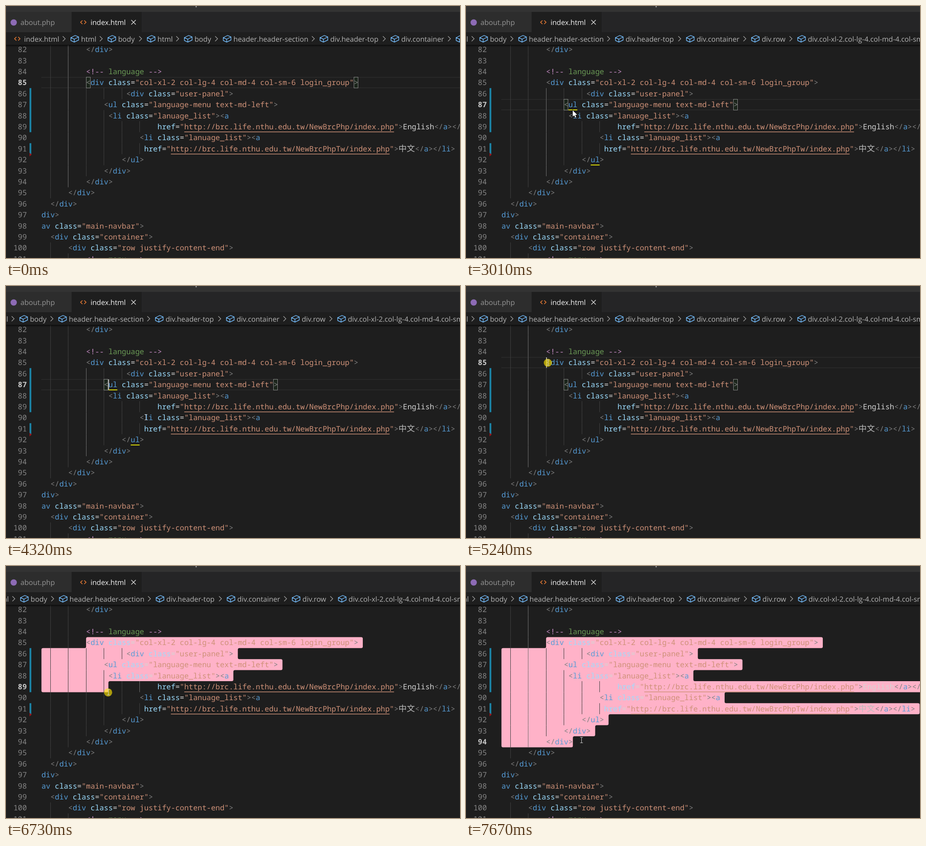
Animation of 1004 by 558 pixels, one loop 8000 ms. Source, as an HTML page with a canvas:

```html
<!DOCTYPE html>
<html lang="en">
<head>
<meta charset="utf-8">
<title>Code editor selection</title>
<style>
  html, body { margin: 0; width: 100%; height: 100%; overflow: hidden; background: #1e1e1e; }
  canvas { display: block; }
</style>
</head>
<body>
<canvas id="stage" width="1004" height="558"></canvas>
<script>
const W = 1004, H = 558, LOOP = 8000;
const ctx = document.getElementById('stage').getContext('2d');
const MONO = '"Noto Sans Mono", "DejaVu Sans Mono", monospace';
const CODE_FONT = `16.45px ${MONO}`;
const UI_FONT = '15.7px "Open Sans", "Noto Sans", sans-serif';
const CJK_FONT = '300 18px "Noto Sans CJK TC", "Noto Sans CJK SC", sans-serif';
const CHAR = 9.87, ROW = 24.4, FIRST = 82, WIDE = 1.85;
const BASELINE = 18, UNDERLINE = 23;
const COLOR = {
  punct: '#808080', tag: '#569cd6', attr: '#9cdcfe', string: '#ce9178',
  text: '#d4d4d4', cjk: '#bdbdbd', comment: '#6a9955', mark: '#c58bc4', pink: '#ffb2c8'
};

const colX = col => 78.4 + col * CHAR;
const rowY = line => 157.4 + (line - 85) * ROW;
const baseY = line => Math.round(rowY(line) + BASELINE);
const isWide = ch => ch > '\u2e80';
const cols = text => [...text].reduce((n, ch) => n + (isWide(ch) ? WIDE : 1), 0);

const SITE = 'http://brc.life.nthu.edu.tw/';
const lines = [
  [10, '</div>'],
  [10, ''],
  [10, '<!-- language -->'],
  [10, '<div class="col-xl-2 col-lg-4 col-md-4 col-sm-6 login_group">'],
  [19, '<div class="user-panel">'],
  [14, '<ul class="language-menu text-md-left">'],
  [15, '<li class="lanuage_list"><a'],
  [26, `href="${SITE}NewBrcPhp/index.php">English</a></li>`],
  [22, '<li class="lanuage_list"><a'],
  [23, `href="${SITE}NewBrcPhpTw/index.php">中文</a></li>`],
  [18, '</ul>'],
  [14, '</div>'],
  [10, '</div>'],
  [6, '</div>'],
  [2, '</div>'],
  [0, 'div>'],
  [0, 'av class="main-navbar">'],
  [2, '<div class="container">'],
  [6, '<div class="row justify-content-end">'],
  [10, '<!-- menu -->']
].map(([indent, text], i) => ({ no: FIRST + i, indent, text, end: indent + cols(text) }));
const lineAt = no => lines[no - FIRST];

// Underlined tag pairs: line, column, length
const tagPairs = {
  85: [[85, 11, 3], [94, 12, 3]],
  87: [[87, 15, 2], [92, 20, 2]]
};

const crumbs = [
  [166, 'html'], [248, 'body'], [335, 'html'], [417, 'body'],
  [503, 'header.header-section'], [717, 'div.header-top'], [874, 'div.container'],
  [1018, 'div.row'], [1120, 'div.col-xl-2.col-lg-4.col-md-4.col-sm-6.login_group']
];

// Each step overrides parts of the editor state from time t on
const steps = [
  { t: 0, line: 85, col: 10, caret: 0, box: 85, tag: 0, crumb: 0, sel: 0, click: 0, arrow: 0 },
  { t: 1420, line: 86, col: 16, caret: 1, box: 0, click: 1 },
  { t: 1850, click: 0 },
  { t: 2360, line: 87, col: 15, box: 87, click: 1 },
  { t: 2520, tag: 87, crumb: -364, click: 0, arrow: 1 },
  { t: 2910, caret: 0 },
  { t: 3380, caret: 1 },
  { t: 4080, arrow: 0 },
  { t: 4510, caret: 0 },
  { t: 5020, caret: 1 },
  { t: 5240, line: 85, col: 10, tag: 0, click: 1 },
  { t: 5310, box: 85 },
  { t: 5450, tag: 85, crumb: -362.4, click: 0 },
  { t: 5760, caret: 0 },
  { t: 6090, click: 1 },
  { t: 6400, col: 11, sel: 1 },
  { t: 6650, line: 87, col: 14, box: 0, tag: 0 },
  { t: 6710, line: 89, col: 15 },
  { t: 6800, line: 91, col: 16 },
  { t: 6900, line: 92, col: 17, caret: 1 },
  { t: 6970, line: 93, col: 17 },
  { t: 7110, line: 94, col: 16 },
  { t: 7670, caret: 0, click: 0 }
];

// Pointer path: time, x, y
const path = [
  [840, 945, 545], [1380, 251, 203], [2080, 251, 203], [2360, 228, 222],
  [2860, 236, 231], [4010, 236, 231], [4150, 309, 291], [4460, 309, 291],
  [4520, 318, 295], [4940, 168, 178], [5020, 181, 170], [6090, 181, 170],
  [6420, 188, 178], [6560, 201, 198], [6620, 201, 198], [6800, 238, 320],
  [6900, 243, 347], [6960, 243, 347], [7350, 255, 386], [8000, 255, 386]
];

function stateAt(t) {
  return Object.assign({}, ...steps.filter(s => s.t <= t));
}

function pointerAt(t) {
  const i = path.findIndex(p => p[0] > t);
  if (i < 1) return null;
  const [t0, x0, y0] = path[i - 1], [t1, x1, y1] = path[i];
  const u = (t - t0) / (t1 - t0), k = u * u * (3 - 2 * u);
  return [x0 + (x1 - x0) * k, y0 + (y1 - y0) * k];
}

function rect(x, y, w, h, color) {
  ctx.fillStyle = color;
  ctx.fillRect(x, y, w, h);
}

function stroke(color, width, ...paths) {
  ctx.strokeStyle = color;
  ctx.lineWidth = width;
  ctx.beginPath();
  for (const pts of paths) pts.forEach(([x, y], i) => i ? ctx.lineTo(x, y) : ctx.moveTo(x, y));
  ctx.stroke();
}

function disc(x, y, r, color) {
  ctx.fillStyle = color;
  ctx.beginPath();
  ctx.arc(x, y, r, 0, Math.PI * 2);
  ctx.fill();
}

function label(text, x, y, color) {
  ctx.font = UI_FONT;
  ctx.fillStyle = color;
  ctx.fillText(text, x, y);
}

function monoText(text, x, y, color, font = CODE_FONT) {
  ctx.fillStyle = color;
  for (const ch of text) {
    ctx.font = isWide(ch) ? CJK_FONT : font;
    ctx.fillText(ch, x, y);
    x += CHAR * cols(ch);
  }
}

function tokenColor(token, next, line) {
  if (token === '<!--' || token === '-->') return COLOR.mark;
  if (/^[<>]/.test(token)) return COLOR.punct;
  if (token[0] === '"') return COLOR.string;
  if (next === '=') return COLOR.attr;
  if (line.startsWith('<!--')) return COLOR.comment;
  if (isWide(token[0])) return COLOR.cjk;
  return token === '=' || token === 'English' ? COLOR.text : COLOR.tag;
}

function drawCode({ no, indent, text }) {
  for (const m of text.matchAll(/<!--|-->|<\/?|>|"[^"]*"|=|[^\s<>="]+/g)) {
    const token = m[0];
    const x = colX(indent + cols(text.slice(0, m.index)));
    monoText(token, x, baseY(no), tokenColor(token, text[m.index + token.length], text));
    if (token.includes('http')) {
      rect(x + CHAR, Math.round(rowY(no) + UNDERLINE), (token.length - 2) * CHAR, 1.4, COLOR.string);
    }
  }
}

function drawGuides(line) {
  const active = lineAt(line).indent;
  const activeCol = active - 1 - (active - 3) % 4;
  const inBlock = no => {
    const step = Math.sign(line - no);
    for (let n = no; n !== line; n += step) if (lineAt(n).indent <= activeCol) return false;
    return true;
  };
  for (const { no, indent } of lines) {
    for (let c = 2; c < indent; c += 4) {
      const lit = c === activeCol && inBlock(no);
      rect(Math.floor(colX(c)), rowY(no), 1, ROW, lit ? '#707070' : '#404040');
    }
  }
}

function drawSelection({ line, col }) {
  const pts = [];
  for (let n = 85; n <= line; n++) {
    const right = colX(n === line ? col : lineAt(n).end + 1);
    pts.push([right, rowY(n)], [right, rowY(n + 1)]);
  }
  const left = colX(10);
  if (line > 85) pts.push([colX(0), rowY(line + 1)], [colX(0), rowY(86)], [left, rowY(86)]);
  else pts.push([left, rowY(86)]);
  pts.push([left, rowY(85)]);
  ctx.fillStyle = COLOR.pink;
  ctx.beginPath();
  ctx.moveTo(left + 5, rowY(85));
  pts.forEach(([x, y], i) => {
    const [nx, ny] = pts[(i + 1) % pts.length];
    ctx.arcTo(x, y, nx, ny, 3.5);
  });
  ctx.fill();
}

function drawBoxes(no) {
  const { indent, end } = lineAt(no);
  for (const c of [indent, end - 1]) {
    const box = [Math.floor(colX(c)) + 0.5, Math.floor(rowY(no)) + 0.5, 9, 24];
    ctx.fillStyle = 'rgba(0,100,0,.1)';
    ctx.fillRect(...box);
    ctx.strokeStyle = '#888';
    ctx.lineWidth = 1;
    ctx.strokeRect(...box);
  }
}

function drawGutter(current) {
  rect(52, rowY(86), 4, ROW * 4, '#1b80a2');
  rect(52, rowY(91), 4, ROW, '#1b80a2');
  ctx.fillStyle = '#94151b';
  ctx.beginPath();
  ctx.moveTo(52, 325);
  ctx.lineTo(57, 329);
  ctx.lineTo(52, 333);
  ctx.fill();
  for (const { no } of lines) {
    const text = String(no), on = no === current;
    monoText(text, 46 - text.length * CHAR, baseY(no),
      on ? '#c6c6c6' : '#858585', on ? `bold ${CODE_FONT}` : CODE_FONT);
  }
}

function angleIcon(x, y) {
  stroke('#e37933', 1.7,
    [[x - 2, y - 4], [x - 6, y], [x - 2, y + 4]],
    [[x + 2, y - 4], [x + 6, y], [x + 2, y + 4]]);
}

function cubeIcon(x, y) {
  const at = (...pts) => pts.map(([dx, dy]) => [x + dx, y + dy]);
  stroke('#75beff', 1.4,
    at([-8.5, -2.5], [1, -7.3], [8.5, -4], [8.5, 3], [-1, 7.5], [-8.5, 4], [-8.5, -2.5], [-1, 1], [8.5, -4]),
    at([-1, 1], [-1, 7.5]));
}

function drawCrumbs(shift) {
  rect(0, 58, W, 29, '#1e1e1e');
  const shade = ctx.createLinearGradient(0, 86, 0, 91);
  shade.addColorStop(0, 'rgba(0,0,0,.6)');
  shade.addColorStop(1, 'rgba(0,0,0,0)');
  rect(0, 86, W, 5, shade);
  ctx.save();
  ctx.translate(shift, 0);
  angleIcon(25, 72.5);
  label('index.html', 40, 79, '#b4b4b4');
  for (const [x, text] of crumbs) {
    const cx = x - 38;
    stroke('#a0a0a0', 1.3, [[cx - 2.5, 67], [cx + 3, 72.5], [cx - 2.5, 78]]);
    cubeIcon(x - 14, 72.5);
    label(text, x, 79, '#b4b4b4');
  }
  ctx.restore();
}

function drawTabs() {
  rect(0, 0, W, 13, '#333333');
  rect(419.5, 0, 2, 3, '#aaa');
  rect(0, 13, W, 45, '#252526');
  rect(0, 13, 145, 45, '#2d2d2d');
  rect(145, 13, 155, 45, '#1e1e1e');
  disc(17, 36.5, 7, '#8d6bb5');
  label('about.php', 32, 42, '#969696');
  angleIcon(171, 36);
  label('index.html', 187, 42, '#f4f4f4');
  stroke('#e0e0e0', 1.4, [[277, 31], [287, 41]], [[287, 31], [277, 41]]);
}

function drawPointer([x, y], { click, arrow }) {
  if (click) disc(x, y, 9, 'rgba(255,230,0,.63)');
  if (arrow) {
    const tip = [[0, 0], [0, 14], [3.3, 11], [5.5, 16], [7.8, 15], [5.6, 10.2], [10, 10]];
    ctx.beginPath();
    for (const [dx, dy] of tip) ctx.lineTo(x + dx, y + dy);
    ctx.closePath();
    ctx.strokeStyle = '#000';
    ctx.lineWidth = 1.5;
    ctx.stroke();
    ctx.fillStyle = '#fff';
    ctx.fill();
    return;
  }
  const cx = Math.round(x) + 0.5, top = Math.round(y) - 6.5;
  stroke('#d0d0d0', 1,
    [[cx, top], [cx, top + 12]],
    [[cx - 3, top], [cx + 3, top]],
    [[cx - 3, top + 12], [cx + 3, top + 12]]);
}

function draw(t) {
  const s = stateAt(t);
  rect(0, 0, W, H, '#1e1e1e');
  if (s.sel) drawSelection(s);
  else {
    rect(78, Math.floor(rowY(s.line)), W, 2, '#282828');
    rect(78, Math.floor(rowY(s.line + 1)) - 1, W, 2, '#282828');
  }
  drawGuides(s.line);
  if (s.box) drawBoxes(s.box);
  lines.forEach(drawCode);
  for (const [no, c, n] of tagPairs[s.tag] || []) {
    rect(colX(c), rowY(no) + UNDERLINE, n * CHAR, 1.7, '#f5f500');
  }
  drawGutter(s.line);
  if (s.caret) rect(Math.round(colX(s.col)), rowY(s.line) + 0.6, 2, ROW - 1, '#aeafad');
  drawCrumbs(s.crumb);
  drawTabs();
  const pointer = pointerAt(t);
  if (pointer) drawPointer(pointer, s);
}

ctx.textRendering = 'geometricPrecision';
const start = performance.now();
function frame() {
  draw((performance.now() - start) % LOOP);
  requestAnimationFrame(frame);
}
frame();
</script>
</body>
</html>
```
